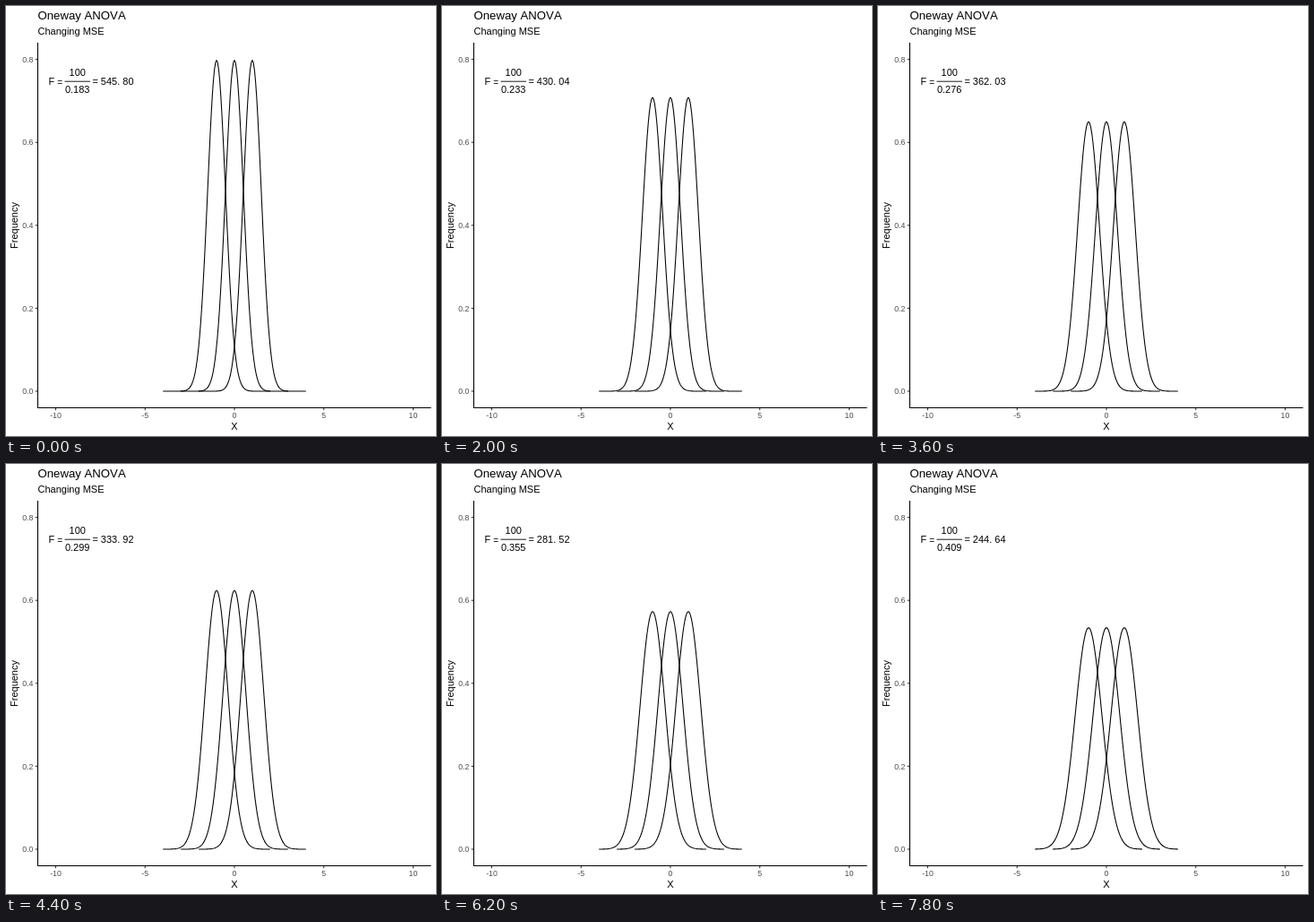
An HTML page that plays this animation: 480x480 px, repeating every 8000 ms.

```html
<!DOCTYPE html>
<html lang="en">
<head>
<meta charset="utf-8">
<title>Oneway ANOVA</title>
<style>
  html, body { margin: 0; width: 100%; height: 100%; overflow: hidden; background: #fff; }
  svg { display: block; width: 100%; height: 100%; }
  text { font: 11px "Liberation Sans", Arial, sans-serif; font-kerning: none; }
  .title { font-size: 13.2px; }
  .tick { font-size: 8.8px; fill: #4d4d4d; }
  .mid { text-anchor: middle; }
  .end { text-anchor: end; }
  path { fill: none; stroke: #000; stroke-width: 1.07; stroke-linejoin: round; }
  #ticks path { stroke: #333; }
</style>
</head>
<body>
<svg viewBox="0 0 480 480">
  <text class="title" x="35.5" y="15">Oneway ANOVA</text>
  <text x="35.5" y="32">Changing MSE</text>
  <g id="ticks"></g>
  <g id="curves"></g>
  <path d="M35.5 41V448.5H474.5"/>
  <text class="mid" x="255" y="473">X</text>
  <text class="mid" transform="translate(13 245) rotate(-90)">Frequency</text>
  <text x="47.6" y="88">F</text>
  <text x="57.2" y="88.5" style="font-size:10px">=</text>
  <text class="mid" x="79.7" y="78">100</text>
  <path d="M65.5 84.2H94" style="stroke-width:.9"/>
  <text class="mid" id="mse" x="79.7" y="97"></text>
  <text x="96.6" y="88">=</text>
  <text id="ratio" x="105.8" y="88"></text>
</svg>
<script>
const STEP = 200, STEPS = 40, START_F = 545.802;
const byId = id => document.getElementById(id);
const px = x => 255 + x * 19.95;
const py = y => 430 - y * 463;

function add(parent, tag, attrs, text = '') {
  const el = document.createElementNS(parent.namespaceURI, tag);
  for (const key in attrs) el.setAttribute(key, attrs[key]);
  el.textContent = text;
  return parent.appendChild(el);
}

const ticks = byId('ticks');
for (let x = -10; x <= 10; x += 5) {
  add(ticks, 'path', { d: `M${px(x)} 448.5v2.75` });
  add(ticks, 'text', { class: 'tick mid', x: px(x), y: 460 }, x);
}
for (let i = 0; i <= 4; i++) {
  const y = py(i / 5);
  add(ticks, 'path', { d: `M35.5 ${y}h-2.75` });
  add(ticks, 'text', { class: 'tick end', x: 30.4, y: y + 3.2 }, (i / 5).toFixed(1));
}

const means = [-1, 0, 1];
const curves = means.map(() => add(byId('curves'), 'path', {}));

// Normal density over mean ± 3
function bell(mean, sd) {
  let d = '';
  for (let i = 0; i <= 100; i++) {
    const u = -3 + i * 0.06;
    const density = Math.exp(-u * u / (2 * sd * sd)) / (sd * Math.sqrt(2 * Math.PI));
    d += `${i ? 'L' : 'M'}${px(mean + u).toFixed(2)} ${py(density).toFixed(2)}`;
  }
  return d;
}

function render(step) {
  const sd = 0.5 + step * 0.5 / 79;
  const f = START_F * 0.25 / (sd * sd);
  curves.forEach((curve, i) => curve.setAttribute('d', bell(means[i], sd)));
  byId('mse').textContent = (100 / f).toFixed(3);
  byId('ratio').textContent = f.toFixed(2).replace('.', '. ');
}

let shown = -1;
const start = performance.now();
function tick() {
  const step = Math.floor((performance.now() - start) / STEP) % STEPS;
  if (step !== shown) render(shown = step);
  requestAnimationFrame(tick);
}
tick();
</script>
</body>
</html>
```
